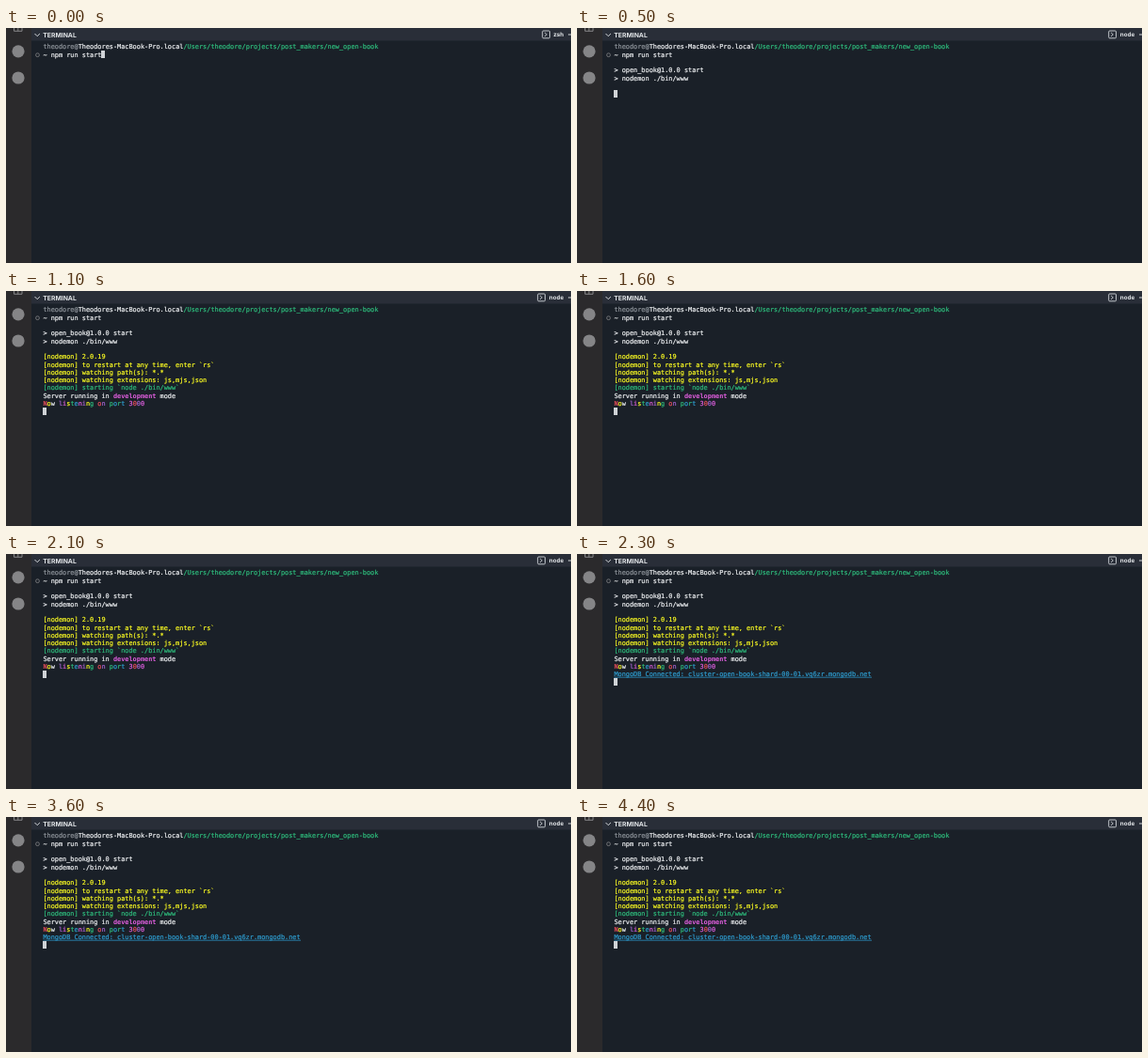
An HTML page that plays this animation: 600 px wide and 250 px high, repeating every 4500 ms.

```html
<!DOCTYPE html>
<html lang="en">
<head>
<meta charset="utf-8">
<title>Terminal</title>
<style>
  html, body { margin: 0; width: 100%; height: 100%; overflow: hidden; background: #1a2028; }
  svg { display: block; }
  text { white-space: pre; text-rendering: geometricPrecision; }
  #rows { font: 6.885px "DejaVu Sans Mono", monospace; stroke-width: .2px; }
  .ui { font: 700 6.3px Inter, "Open Sans", sans-serif; fill: #e4e7ea; }
  .line { fill: none; stroke: #858587; }
</style>
</head>
<body>
<svg width="600" height="250" viewBox="0 0 600 250">
  <rect width="600" height="250" fill="#1a2028"/>
  <rect x="27" width="573" height="13.5" fill="#292e38"/>
  <rect width="27" height="250" fill="#2b2a2c"/>

  <path class="line" d="M8.5 0V3.3H17V0M12.8 0V3.3"/>
  <circle cx="13" cy="24.8" r="6.6" fill="#858587"/>
  <circle cx="13" cy="53" r="6.6" fill="#858587"/>

  <path class="line" d="M30.5 6L33.2 8.7L35.9 6" style="stroke:#d5d8dc"/>
  <text class="ui" x="39.3" y="9.5" style="font-size:6.8px">TERMINAL</text>
  <g id="icon" class="line" style="stroke:#d0d4d8" stroke-width=".9">
    <rect x=".4" y="3" width="7.8" height="7.8" rx="1"/>
    <path d="M2.8 4.9L5 6.9L2.8 8.9"/>
  </g>
  <text id="shell" class="ui" x="592.3" y="9.4" text-anchor="end"></text>
  <path d="M597 7H600" stroke="#d0d4d8"/>

  <circle class="line" cx="33.5" cy="28.7" r="1.9" stroke-width=".8"/>
  <g id="rows"></g>
  <path id="link" d="M39.4 131.2H313" stroke="#2b93c4" stroke-width=".8"/>
  <rect id="cursor" width="4" height="8" fill="#d0d3d7"/>
</svg>
<script>
const LEFT = 39.4, PITCH = 8.3, ADVANCE = 4.145, LOOP = 4500;
const white = '#f2f4f6', gray = '#8f959c', green = '#2ebd7d', yellow = '#ffff22',
      blue = '#2e9dd0', pink = '#e05ede', red = '#ee4f5c', violet = '#a565d2';
const $ = id => document.getElementById(id);
const span = (color, text, extra = '') =>
  `<tspan fill="${color}" stroke="${color}" ${extra}>${text}</tspan>`;
const note = text => span(yellow, '[nodemon] ' + text);

// One colour key per letter
const palette = { r: red, g: green, y: yellow, b: blue, p: pink, v: violet, w: white };
const confetti = (text, keys) =>
  [...text].map((c, i) => span(palette[keys[i]] || white, c)).join('');

const rows = [
  span(gray, 'theodore@') + span(white, 'Theodores-MacBook-Pro.local') +
    span(green, '/Users/theodore/projects/post_makers/new_open-book'),
  span(white, '~ npm run start'),
  '',
  span(white, '&gt; open_book@1.0.0 start'),
  span(white, '&gt; nodemon ./bin/www'),
  '',
  note('2.0.19'),
  note('to restart at any time, enter `rs`'),
  note('watching path(s): *.*'),
  note('watching extensions: js,mjs,json'),
  span(green, '[nodemon] starting `node ./bin/www`'),
  span(white, 'Server running in ') +
    span(pink, 'development', 'font-weight="700" stroke-width="0"') + span(white, ' mode'),
  confetti('Now listening on port 3000', 'ryw vpygbpvyg rv gbgb prvp'),
  span(blue, 'MongoDB Connected: cluster-open-book-shard-00-01.vq6zr.mongodb.net')
];

$('rows').innerHTML = rows.map((row, i) =>
  `<text x="${LEFT}" y="${22.4 + i * PITCH}">${row}</text>`).join('');
const lines = [...$('rows').children];

// Start time, cursor row, cursor column, shell label
const steps = [
  [0, 1, 15, 'zsh'],
  [200, 2, 0, 'zsh'],
  [500, 6, 0, 'node'],
  [700, 11, 0, 'node'],
  [1000, 13, 0, 'node'],
  [2300, 14, 0, 'node']
];

function draw(now) {
  const t = now % LOOP;
  const [, row, col, label] = steps.filter(s => s[0] <= t).pop();
  lines.forEach((line, i) => {
    line.style.visibility = i < row + (col > 0) ? 'visible' : 'hidden';
  });
  $('link').style.visibility = row > 13 ? 'visible' : 'hidden';
  $('cursor').setAttribute('x', Math.floor(LEFT + col * ADVANCE));
  $('cursor').setAttribute('y', Math.round(15.8 + row * PITCH));
  $('shell').textContent = label;
  $('icon').setAttribute('transform', `translate(${label === 'zsh' ? 569.3 : 564.3} 0)`);
}

const start = performance.now();
function tick() {
  draw(performance.now() - start);
  requestAnimationFrame(tick);
}
tick();
</script>
</body>
</html>
```
